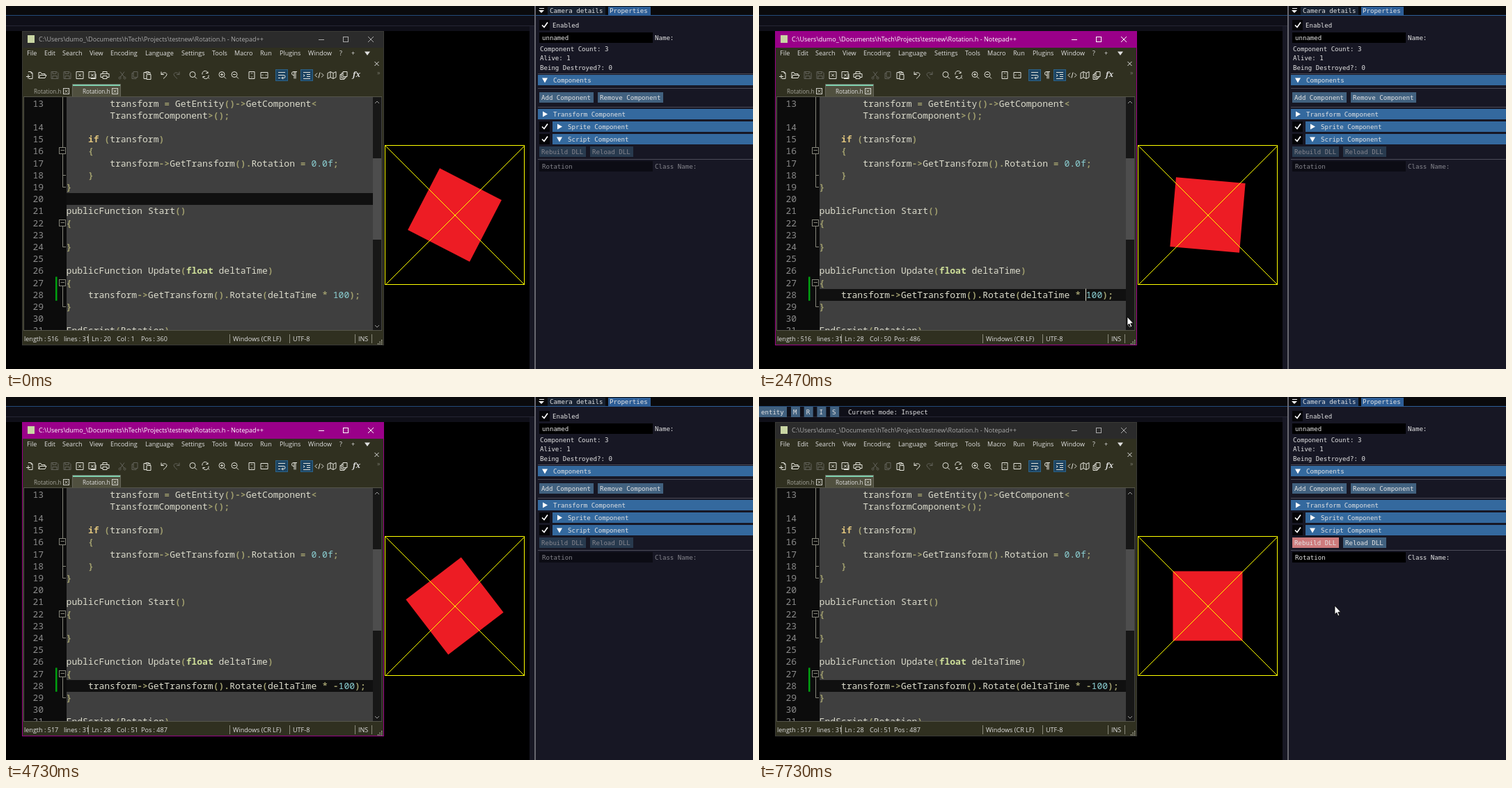
Recreate the animation shown at these times as an HTML page with a canvas. Size 1073x522 px, loop 8 s.

```html
<!DOCTYPE html>
<html>
<head>
<meta charset="utf-8">
<style>
html, body { margin: 0; width: 100%; height: 100%; overflow: hidden; background: #000; }
canvas { display: block; }
</style>
</head>
<body>
<canvas id="stage" width="1073" height="522"></canvas>
<script>
const c = document.getElementById('stage').getContext('2d');
const UI = '9.05px "Open Sans", "Noto Sans", sans-serif';
const TAB = '8.2px "Open Sans", "Noto Sans", sans-serif';
const MONO = '9.08px "DejaVu Sans Mono", monospace';
const CODE = '13.03px "Noto Sans Mono", monospace';
const BLUE = '#34699e', BUTTON = '#41617f', LIGHT = '#e0e0e0', INK = '#e4e4e4';
const COL = 7.82, ROW = 17.2, LEFT = 86.6, TOP = 131.4;

// Steps of 1/15 s
const CLICK = 21, LEFT_KEY = 34, TYPE = 42, SAVE = 56, STOP = 74, TABS_LIT = 78, PRESS = 87;
const PATHS = [
  [[3, 1080, 530], [10, 640, 440], [13, 462, 410], [17, 474, 405], [21, 474, 405], [25, 529, 447], [57, 529, 447]],
  [[75, 1085, 70], [80, 940, 150], [86, 822, 206], [87, 819, 211], [106, 819, 211], [107, 810, 228], [108, 803, 252],
   [109, 805, 275], [110, 811, 290], [111, 816, 296], [114, 816, 296], [116, 827, 300], [120, 827, 300]]
];

const LINES = [
  [13, '        transform = GetEntity()->GetComponent<'],
  ['', '        TransformComponent>();'],
  [14, ''],
  [15, '    if (transform)'],
  [16, '    {'],
  [17, '        transform->GetTransform().Rotation = 0.0f;'],
  [18, '    }'],
  [19, '}'],
  [20, ''],
  [21, 'publicFunction Start()'],
  [22, '{'],
  [23, ''],
  [24, '}'],
  [25, ''],
  [26, 'publicFunction Update(float deltaTime)'],
  [27, '{'],
  [28, '    transform->GetTransform().Rotate(deltaTime * 100);'],
  [29, '}'],
  [30, ''],
  [31, 'EndScript(Rotation)']
];

const MENU = { File: 30, Edit: 55, Search: 81, View: 120, Encoding: 150, Language: 200, Settings: 252, Tools: 296,
  Macro: 328, Run: 365, Plugins: 393, Window: 434, '?': 479, '+': 496 };

// Toolbar icons, drawn around their centres
const SAVE_ICON = 'M-5-5H3L5-3V5H-5ZM-3-5V-2H2V-5M-3 5V1H3V5';
const LENS = 'M3-1A4 4 0 1 1-5-1A4 4 0 1 1 3-1M2 2L5 5';
const ICONS = [
  [34, 'M-2-5H2L4-3V5H-1M2-5V-3H4M-5 2H1M-2-1V5'],
  [52, 'M-5 4V-4H-2L-1-2H4V0M-5 4L-3 0H6L4 4Z'],
  [70, SAVE_ICON, 's'], [88, SAVE_ICON, 's'],
  [106, 'M-5-5H5V5H-5ZM-2-2L2 2M2-2L-2 2'],
  [124, 'M-5-5H4V4H-5ZM-2-2L2 2M2-2L-2 2M5-2V5H-2'],
  [142, 'M-3-2V-5H3V-2M-3 3H-6V-2H6V3H3M-3 1H3V5H-3Z'],
  [167, 'M-3-5L3 3M3-5L-3 3M-2 4A1.5 1.5 0 1 1-5 4A1.5 1.5 0 1 1-2 4M5 4A1.5 1.5 0 1 1 2 4A1.5 1.5 0 1 1 5 4', 'd'],
  [185, 'M-2-5H4V3H-2ZM-2-3H-4V5H2V3', 'd'],
  [203, 'M-2-4H-5V5H-1M2-4H4V-1M-2-5H2V-3H-2ZM-1-1H5V6H-1Z'],
  [227, 'M-4-5V-1H0M-4-1C-1-5 4-4 4-1Q4 1-1 5'],
  [245, 'M4-5V-1H0M4-1C1-5-4-4-4-1Q-4 1 1 5', 'd'],
  [269, LENS],
  [287, 'M-5-1A4 4 0 0 1 3-3V-5M3-3H0M4 0A4 4 0 0 1-4 2V4M-4 2H-1M3 3L5 5'],
  [311, LENS + 'M-3-1H1M-1-3V1'], [329, LENS + 'M-3-1H1'],
  [353, 'M-4-5H4V5H-4ZM-1-2L0-3L1-2M-1 2L0 3L1 2'],
  [371, 'M-5-4H5V4H-5ZM-2-1L-3 0L-2 1M2-1L3 0L2 1'],
  [396, 'M-5-4H5M-5 0H3Q5 0 5 2Q5 4 3 4H0M2 2L0 4L2 6M-5 4H-2', 'h'],
  [414, 'M4-5H-1A2.5 2.5 0 0 0-1 0H0M0-5V5M2-5V5'],
  [432, 'M-5-4H5M0-1H5M0 2H5M-5 5H5M-5-1L-3 .5L-5 2', 'h'],
  [450, 'M-3-3L-6 0L-3 3M3-3L6 0L3 3M1-4L-1 4'],
  [468, 'M-6-3L-2-5L2-3L6-5V3L2 5L-2 3L-6 5ZM-2-5V3M2-3V5'],
  [485, 'M-1-5H5V2H-1ZM-1-3H-3V4H3V2M-3-1H-5V6H1V4']
].map(([x, d, kind]) => [x, new Path2D(d), kind]);

function rect(color, x, y, w, h) {
  c.fillStyle = color;
  c.fillRect(x, y, w, h);
}

function text(s, x, mid, color = LIGHT, font = UI) {
  c.font = font;
  c.fillStyle = color;
  c.fillText(s, x, mid + (font.endsWith(CODE) ? 4.5 : 3.2));
}

function mono(s, x, mid, color = INK) {
  text(s, x, mid, color, MONO);
}

function line(color, points, width = 1, close = false) {
  c.beginPath();
  points.forEach(([x, y]) => c.lineTo(x, y));
  if (close) c.closePath();
  c.strokeStyle = color;
  c.lineWidth = width;
  c.stroke();
}

function poly(color, points) {
  c.beginPath();
  points.forEach(([x, y]) => c.lineTo(x, y));
  c.fillStyle = color;
  c.fill();
}

function cross(x, y, r, color) {
  line(color, [[x - r, y - r], [x + r, y + r]]);
  line(color, [[x - r, y + r], [x + r, y - r]]);
}

function box(color, x, y, w, h) {
  c.strokeStyle = color;
  c.lineWidth = 1;
  c.strokeRect(x, y, w, h);
}

function button(label, x, y, w, color = BUTTON, ink = INK) {
  rect(color, x, y, w, 15);
  mono(label, x + 3, y + 7.5, ink);
}

function tick(y) {
  rect('#050508', 766, y - 7.5, 15, 15);
  line('#fff', [[770, y], [773, y + 3], [778, y - 4]], 1.7);
}

function header(label, x, y, open) {
  rect(BLUE, x, y - 7.5, 1073 - x, 15);
  const m = x + 10;
  poly('#fff', open ? [[m - 4, y - 3], [m + 4, y - 3], [m, y + 4]] : [[m - 3, y - 4], [m + 4, y], [m - 3, y + 4]]);
  mono(label, x + 22, y);
}

function field(label, name, y, off) {
  const ink = off ? '#85858c' : INK;
  rect(off ? '#0c0c14' : '#000', 766, y - 7.5, 163, 15);
  mono(label, 770, y, ink);
  mono(name, 932, y, ink);
}

function engine(k) {
  const edit = k >= STOP;
  rect('#000', 0, 0, 1073, 522);
  rect('#0a0a0c', 0, 0, 759, 13);
  rect('#0f0f18', 0, 13, 759, 23);
  rect('#234a78', 0, 13, 759, 1);
  rect('#262633', 0, 28, 759, 1);
  rect('#171724', 752, 29, 7, 493);
  if (edit) {
    button('entity', 0, 14, 40);
    ['M', 'R', 'I', 'S'].forEach((s, i) => button(s, 46 + i * 18.7, 14, 13));
    mono('Current mode: Inspect', 128, 22);
  }

  rect('#171724', 761, 0, 312, 522);
  rect('#0a0a0c', 761, 0, 312, 13);
  rect('#66666f', 759, 0, 2, 522);
  line('#fff', [[766, 3.5], [773, 3.5]]);
  poly('#fff', [[765, 6], [773, 6], [769, 10]]);
  rect(k >= TABS_LIT ? '#1f3d66' : '#172130', 778, 1, 83, 12);
  rect('#2d5e97', 865, 1, 61, 12);
  rect('#2d5e97', 761, 13, 312, 1);
  mono('Camera details', 781, 7);
  mono('Properties', 867, 7);

  tick(27.5);
  mono('Enabled', 785, 28);
  field('unnamed', 'Name:', 45.5);
  ['Component Count: 3', 'Alive: 1', 'Being Destroyed?: 0'].forEach((s, i) => mono(s, 767, 62 + i * 13.2));
  [97, 118, 145, 220].forEach(y => rect('#4c4c58', 764, y, 309, 1));
  header('Components', 764, 106.5, true);
  button('Add Component', 766, 124, 78);
  button('Remove Component', 850, 124, 94);
  header('Transform Component', 764, 155.5);
  tick(173.5);
  header('Sprite Component', 785, 173.5);
  tick(191.5);
  header('Script Component', 785, 191.5, true);
  const base = edit ? BUTTON : '#283a4e', ink = edit ? INK : '#85858e';
  button('Rebuild DLL', 766, 202, 67, k >= PRESS ? '#cd7b7d' : base, ink);
  button('Reload DLL', 839, 202, 62, base, ink);
  field('Rotation', 'Class Name:', 230.5, !edit);
}

function sprite(k) {
  c.save();
  c.translate(644.5, 300.5);
  c.rotate(k < STOP ? (27.3 + 100.4 * k / 15) * Math.PI / 180 : 0);
  rect('#ed1c24', -50, -50, 100, 100);
  c.restore();
  box('#ff0', 544.5, 200.5, 200, 200);
  line('#ff0', [[544.5, 200.5], [744.5, 400.5]]);
  line('#ff0', [[545.5, 400.5], [744.5, 201.5]]);
}

function codeLine(s, mid) {
  for (const m of s.matchAll(/\d[\d.]*f?|\w+|[^\w\s]+/g)) {
    const t = m[0], word = /^\w/.test(t);
    const key = { if: '#dfc47d', float: '#cedf99' }[t];
    const color = key || (/^\d/.test(t) ? '#8cd0d3' : word ? '#dcdccc' : '#9f9d6d');
    text(t, LEFT + m.index * COL, mid, color, key || !word ? 'bold ' + CODE : CODE);
  }
}

function code(k, t) {
  const typed = k >= TYPE, current = k < CLICK ? 8 : 16;
  c.save();
  c.beginPath();
  c.rect(26, 131, 514, 335);
  c.clip();
  rect('#3f3f3f', 26, 131, 514, 335);
  rect('#0c0c0c', 26, 131, 61, 335);
  rect('#101010', 87, Math.round(TOP + current * ROW), 440, 17);

  LINES.forEach(([n, s], i) => {
    const mid = TOP + (i + .5) * ROW;
    c.textAlign = 'right';
    text(String(n), 54, mid, '#8a8a8a', CODE);
    c.textAlign = 'left';
    codeLine(i === 16 && typed ? s.replace('100', '-100') : s, mid);
  });

  const fold = '#85857a', rowMid = r => Math.floor(TOP + (r + .5) * ROW) + .5;
  [[-1, 7], [10, 12], [15, 17]].forEach(([a, b]) =>
    line(fold, [[81.5, rowMid(a)], [81.5, rowMid(b)], [86, rowMid(b)]]));
  line(fold, [[81.5, rowMid(6)], [86, rowMid(6)]]);
  [4, 10, 15].forEach(r => {
    const y = rowMid(r) - 1;
    rect('#0c0c0c', 77, y - 4, 9, 9);
    box(fold, 76.5, y - 4, 9, 9);
    line(fold, [[78.5, y], [84, y]]);
  });
  rect('#00a010', 71, TOP + 15 * ROW, 2.5, ROW * 2);
  if (typed && k < SAVE) rect('#ff8000', 71, TOP + 16 * ROW, 2.5, ROW);

  const since = [TYPE, LEFT_KEY, CLICK].find(s => k >= s);
  if (since && k < STOP && Math.floor((t - since * 1000 / 15) / 530) % 2 === 0)
    rect('#dcdccc', since === LEFT_KEY ? 469 : 477, TOP + 16 * ROW, 1, ROW);

  rect('#171717', 527, 131, 12, 335);
  rect('#4d4d4d', 527, 219, 12, 117);
  line('#999', [[530, 140], [533, 137], [536, 140]]);
  line('#999', [[530, 459], [533, 462], [536, 459]]);
  c.restore();
}

function editor(k, t) {
  const active = k >= CLICK && k < STOP, dirty = k >= TYPE && k < SAVE;
  const ink = active ? '#fff' : '#aaa', frame = active ? '#9a0089' : '#2b2b2b';
  rect('#303020', 24, 36, 519, 452);
  rect(frame, 24, 36, 519, 24);
  box(active ? '#9a0089' : '#3a3a36', 23.5, 36.5, 519, 451);
  rect('#c9d6a4', 31, 42, 10, 11);
  text((dirty ? '*' : '') + 'C:\\Users\\dumo_\\Documents\\hTech\\Projects\\testnew\\Rotation.h - Notepad++', 47, 48, ink);
  line(ink, [[449, 48.5], [457, 48.5]]);
  box(ink, 484.5, 44.5, 7, 7);
  cross(524, 48, 4, ink);

  for (const name in MENU) text(name, MENU[name], 68);
  poly(LIGHT, [[515, 65.5], [523, 65.5], [519, 71]]);
  cross(532.5, 83, 3, LIGHT);

  for (const [x, path, kind] of ICONS) {
    if (kind === 'h') {
      rect('#1d4462', x - 9, 91, 18, 17);
      box('#2b6288', x - 8.5, 91.5, 17, 16);
    }
    c.save();
    c.translate(x, 99.5);
    c.strokeStyle = kind === 'd' || kind === 's' && !dirty ? '#62625a' : '#e4e4dc';
    c.lineWidth = 1;
    c.stroke(path);
    c.restore();
  }
  text('fx', 498, 99, LIGHT, 'italic bold 11px "Noto Serif", serif');
  text('»', 533, 96, '#77776c');

  rect('#50503f', 95, 112, 70, 19);
  rect('#7fd0ae', 95, 112, 70, 3);
  box('#66665a', 95.5, 112.5, 69, 18);
  text('Rotation.h', 40, 122.5, '#a5a59c', TAB);
  text('Rotation.h', 110, 122.5, LIGHT, TAB);
  if (dirty) line('#e4e4dc', [[99, 126], [105, 119]], 2);
  [87, 157].forEach(x => {
    box('#d0d0c8', x - 4.5, 118.5, 8, 8);
    cross(x - .5, 122.5, 2, '#d0d0c8');
  });

  box('#55554a', 25.5, 130.5, 514, 336);
  code(k, t);

  const moved = k >= LEFT_KEY && k < TYPE;
  const status = [['length : ' + (k < TYPE ? 516 : 517), 26], ['lines : 31', 83],
    ['Ln : ' + (k < CLICK ? 20 : 28), 123], ['Col : ' + (k < CLICK ? 1 : moved ? 50 : 51), 159],
    ['Pos : ' + (k < CLICK ? 360 : moved ? 486 : 487), 194], ['Windows (CR LF)', 326], ['UTF-8', 412], ['INS', 506]];
  status.forEach(([s, x]) => text(s, x, 478.5));
  [118, 321, 407, 501, 525].forEach(x => rect('#8a8a7c', x, 472, 1, 13));
  for (let i = 0; i < 3; i++)
    for (let j = 0; j <= i; j++) rect('#c0c0b4', 539 - j * 2.6, 480 + i * 2.6, 1.4, 1.4);
}

function pointer(k) {
  const path = PATHS.find(p => k > p[0][0] && k <= p[p.length - 1][0]);
  if (!path) return;
  const i = path.findIndex(p => k <= p[0]);
  const [k0, x0, y0] = path[i - 1], [k1, x1, y1] = path[i];
  const f = (k - k0) / (k1 - k0), x = x0 + (x1 - x0) * f, y = y0 + (y1 - y0) * f;
  if (x < 527 && y > 131 && y < 466) {
    line('#ddd', [[x - 3, y - 6.5], [x + 3, y - 6.5]]);
    line('#ddd', [[x, y - 6.5], [x, y + 6.5]]);
    line('#ddd', [[x - 3, y + 6.5], [x + 3, y + 6.5]]);
    return;
  }
  const shape = [[0, 0], [0, 12.5], [2.8, 10], [4.8, 14.8], [6.8, 14], [4.8, 9.4], [8.6, 9.2]].map(p => [x + p[0], y + p[1]]);
  poly('#fff', shape);
  line('#000', shape, .8, true);
}

function draw(now) {
  const t = now % 8000;
  const k = Math.min(119, Math.floor((t + 4) * 15 / 1000));
  engine(k);
  sprite(k);
  editor(k, k * 1000 / 15 + 1);
  pointer(k);
}

const start = performance.now();
function loop() {
  draw(performance.now() - start);
  requestAnimationFrame(loop);
}
loop();
</script>
</body>
</html>
```
